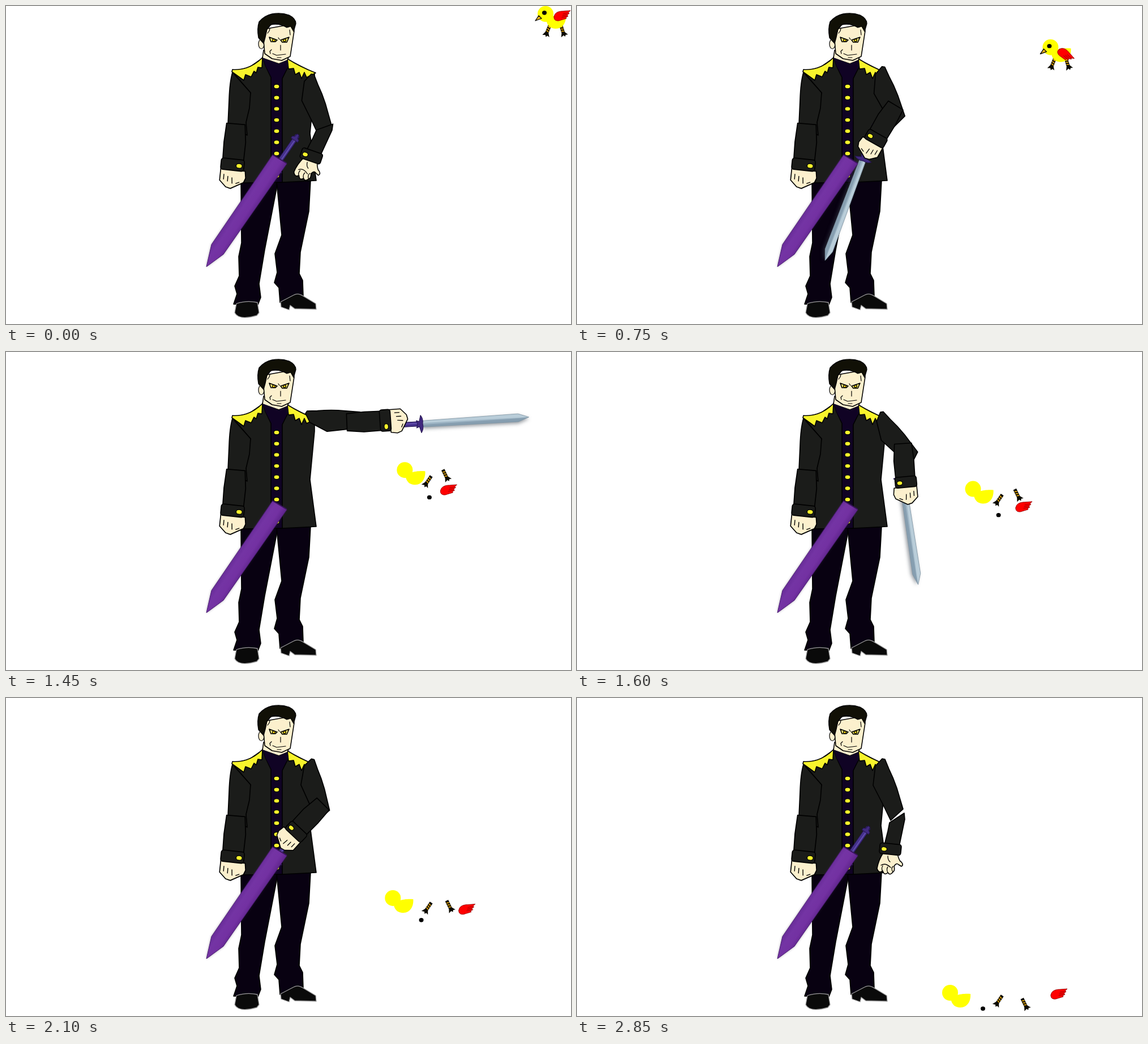
Animation, 998 px wide and 561 px high, one loop 2900 ms. Source, as an HTML page with a canvas:

```html
<!DOCTYPE html>
<html>
<head>
<meta charset="utf-8">
<style>
html, body { margin: 0; width: 100%; height: 100%; overflow: hidden; background: #fff; }
canvas { display: block; }
</style>
</head>
<body>
<canvas id="stage" width="998" height="561"></canvas>
<script>
const ctx = document.getElementById('stage').getContext('2d');
const LOOP = 2900, STEP = 50;
const GRAB = 550, DRAWN = 1100, HIT = 1250, THRUST = 1400, HOLD = 1450;
const LOWERED = 1650, INSERT = 1800, SHEATHED = 1950, LETGO = 2200, END = 2850;
const CLOTH = '#1b1c1a', SKIN = '#fcf0cd', GOLD = '#f8f42c', PANTS = '#080111', SHIRT = '#100324';
const rad = d => d * Math.PI / 180;
const part = (t, from, to) => Math.min(1, Math.max(0, (t - from) / (to - from)));
const mix = (a, b, k) => a.map((v, i) => v + (b[i] - v) * k);

function shape(d, fill, stroke = '#000', width = 1.6) {
  const p = new Path2D(d);
  if (fill) { ctx.fillStyle = fill; ctx.fill(p); }
  if (stroke) { ctx.strokeStyle = stroke; ctx.lineWidth = width; ctx.stroke(p); }
}

const line = (d, width = 1.2) => shape(d, null, '#000', width);

function oval(x, y, rx, ry, fill, stroke) {
  ctx.beginPath();
  ctx.ellipse(x, y, rx, ry, 0, 0, Math.PI * 2);
  ctx.fillStyle = fill;
  ctx.fill();
  if (stroke) { ctx.strokeStyle = stroke; ctx.lineWidth = 1.2; ctx.stroke(); }
}

const button = (x, y) => oval(x, y, 5, 3.8, GOLD, '#000');

function cuff(x, y, deg) {
  placed(x, y, deg, () => {
    ctx.beginPath();
    ctx.roundRect(-19, -9.5, 38, 19, 4);
    ctx.fillStyle = CLOTH;
    ctx.fill();
    ctx.strokeStyle = '#000';
    ctx.lineWidth = 1.6;
    ctx.stroke();
    button(-11, 1);
  });
}

function placed(x, y, deg, draw, sx = 1, sy = 1) {
  ctx.save();
  ctx.translate(x, y);
  ctx.rotate(rad(deg));
  ctx.scale(sx, sy);
  draw();
  ctx.restore();
}

// Open hand: elbow x, y and forearm turn
const OPEN = { start: [563, 213, 13], reach: [554, 197, 15.4], release: [563, 203, 18.7], rest: [565, 211, 0] };
// Fist: elbow x, y, forearm turn; sword guard x, y and angle
const FIST = {
  grip: [560, 187, 37, 475, 286, 124.7],
  drawn: [568, 155, 0, 560, 243, 86.4],
  thrust: [602, 124, -100, 733, 126.5, -3.5],
  lowered: [567, 174, 18, 522, 253, 110],
  insert: [567, 174, 18, 522, 253, 104.5]
};

function fistPose(t) {
  if (t < DRAWN) return mix(FIST.grip, FIST.drawn, part(t, GRAB, DRAWN));
  if (t < HOLD) return mix(FIST.drawn, FIST.thrust, part(t, DRAWN, THRUST));
  if (t < LOWERED) return mix(FIST.thrust, FIST.lowered, part(t, HOLD, LOWERED));
  if (t < INSERT) return mix(FIST.lowered, FIST.insert, part(t, LOWERED, INSERT));
  return mix(FIST.insert, FIST.grip, part(t, INSERT, SHEATHED));
}

function openPose(t) {
  return t < GRAB ? mix(OPEN.start, OPEN.reach, part(t, 0, GRAB))
    : mix(OPEN.release, OPEN.rest, part(t, LETGO, END));
}

function legs() {
  shape('M415 310H479L478 322L457 430L447 490L450 514L445 527L402 526L408 508L404 494L412 476L411 442L416 418Z', PANTS);
  shape('M478 310L538 308L535 362L520 434L518 472L524 484L525 512L484 523L482 497L474 488L479 470L475 437L487 404Z', PANTS);
  shape('M407 525L404 541Q411 555 443 546L447 541L444 523Q425 519 407 525Z', '#0a0a0a', '#999', 1.3);
  shape('M485 522L486 531L500 536L502 528L510 534L548 535L547 525L527 513Q516 505 508 510Z', '#0a0a0a', '#999', 1.3);
}

function torso() {
  shape('M400 116L430 108L453 92L497 94L545 119L545 140L537 225L548 308L488 311L415 312L424 205L432 153Z', CLOTH);
  shape('M453 90L497 94L499 106L488 128V311H468V126L459 107Z', SHIRT);
  for (let y = 142; y < 302; y += 19.7) button(478, y);
  shape('M453 91Q440 104 425 109Q411 113 400 112L399 116L420 131L423 121L433 125L438 115L442 118L445 108L452 109Z', GOLD);
  shape('M497 93Q519 107 547 118L531 126L527 117L522 128L518 117L511 121L508 110L499 111Z', GOLD);
  shape('M400 117L432 153L430 180L424 205L426 228L392 208L394 165Q395 134 400 117Z', CLOTH);
  placed(406, 208, 12, forearm, -1.08, 1.06);
}

function head() {
  shape('M455 78L453 92L482 102L497 96L501 84Z', SKIN);
  shape('M453 91L482 102L497 95L499 106L488 124H468L459 107Z', SHIRT, null);
  oval(451, 67, 5, 8.5, SKIN, '#000');
  shape('M455 60L461 40L506 32L509 44L502 89L487 96L470 93L457 84Z', SKIN);
  shape('M455 66L446 56Q443 40 447 28Q456 17 470 14Q486 11 500 16Q512 22 512 31L508 45L503 36L496 38Q483 30 468 33L461 41L458 55Z', '#111006', '#000', 1.3);
  shape('M465 55L479 60L476 63H468Z', '#e9df70');
  shape('M485 60L500 55L496 64H488Z', '#e9df70');
  for (const x of [473, 492]) oval(x, 60.5, 2.4, 2.4, '#ecc90c', '#000');
  line('M466 40L465 44L462 48M501 42L502 51M481 56L483 59M485 69V78M469 77L466 80L467 84M471 84L478 87L494 85M479 91H486');
}

function sword([x, y, deg]) {
  placed(x, y, deg, () => {
    const a = rad(deg), blade = 'M3 -5L172 -7L191 0L172 7L3 6Z';
    ctx.save();
    ctx.shadowColor = 'rgba(60,70,80,.55)';
    ctx.shadowBlur = 6;
    ctx.shadowOffsetX = -3 * Math.sin(a);
    ctx.shadowOffsetY = 3 * Math.cos(a);
    shape(blade, '#9db4c4', null);
    ctx.restore();
    shape('M3 -5L172 -7L191 0L3 -1Z', '#b9cdd9', null);
    shape('M3 2L174 1L191 0L172 7L3 6Z', '#869eb0', null);
    shape(blade, null, '#7d919f', .7);
    shape('M-70 -4H0V4H-70Z', '#45318c', '#25164f', 1);
    shape('M-64 -1H-4', null, '#6a55b5', 1.4);
    shape('M-72 -2L-66 -3L-64 -7H-60V7H-64L-66 3L-72 2Z', '#402a80', '#25164f', 1);
    shape('M0 -15Q5 -8 3 0Q5 9 0 16L-3 5L-8 7L-6 0L-8 -6L-3 -4Z', '#40287f', '#25164f', 1);
  });
}

function sheath() {
  const body = 'M471 263L496 278L384 438L354 460L363 421Z';
  const g = ctx.createLinearGradient(410, 345, 440, 365);
  ['#642994', '#7434a4', '#7331a2', '#5c2389'].forEach((c, i) => g.addColorStop(i / 3, c));
  ctx.save();
  ctx.shadowColor = 'rgba(60,40,80,.5)';
  ctx.shadowBlur = 4;
  shape(body, g, null);
  ctx.restore();
  shape(body, null, '#4a1c72', 1);
  shape('M472 263L495 277', null, '#3a155e', 2);
}

// Forearm shapes have the elbow at 0, 0.
function forearm() {
  shape('M-15 -2L15 2L13 33L9 62L-25 58L-22 27Z', CLOTH);
  shape('M-31 74L-34 85L-32 93L-13 107L-5 106L7 97L9 77Z', SKIN);
  line('M-12 89L-14 98M-5 88L-6 96M2 86L1 94M-25 94L-20 97', 1.3);
  cuff(-8.5, 67.5, 6);
}

function openForearm() {
  shape('M13 -8L14 3L4 51L-22 48L-16 24L-13 9Z', CLOTH);
  shape('M-24 62Q-33 76 -35 90Q-32 99 -25 94Q-22 103 -16 97Q-12 103 -7 96Q-3 94 -5 86Q-1 79 3 83L8 86C12 84 10 79 6 77Q2 71 1 62Z', SKIN);
  line('M-25 95Q-28 90 -25 85M-16 97Q-19 91 -16 87M-7 96Q-11 90 -7 86M-28 84Q-20 79 -11 88M-16 68Q-16 75 -12 78', 1.3);
  cuff(-11.5, 55.5, 6);
}

// The upper arm aims at a point just below the elbow; the shoulder rises at first.
function arm(t, [ex, ey, turn], fore) {
  const sx = 535, sy = 115 + 13 * (1 - part(t, 0, GRAB));
  const dir = rad(turn + 100);
  const aim = Math.atan2(ey + 12 * Math.sin(dir) - sy, ex + 12 * Math.cos(dir) - sx);
  placed(sx, sy, aim * 180 / Math.PI - 75.5, () =>
    shape('M4 -8L9 -7L16 10Q24 26 30 44L41 81L19 101L5 72L-12 39L-8 5Z', CLOTH));
  placed(ex, ey, turn, fore);
}

function birdBody() {
  oval(0, 0, 14, 14, '#ff0');
  shape('M2 14C4 4 20 1 36 2C37 14 31 26 18 26C9 26 4 21 2 14Z', '#ff0', null);
}

function leg() {
  shape('M-3 -11H3V4L7 10L3 9L1 12L-1 9L-6 11L-3 4Z', '#0c0a00', null);
  for (let y = -7; y < 4; y += 4) shape(`M-1.5 ${y}L1.5 ${y + 1}`, null, '#e8a800', 1.8);
}

function wing() {
  shape('M-2 0C-1 -8 7 -10 14 -10L27 -11L23 -7L25 -6L21 -3L23 -1L19 1L20 3L10 6C3 9 -3 6 -2 0Z', '#f00', '#8a0000', .8);
  for (let i = 0; i < 3; i++) shape(`M${14 - i} ${i * 3 - 5}l9 -2`, null, '#8a0000', .8);
}

// Offsets from the head while whole, then places just after the cut and at the end
const PIECES = [
  { draw: leg, home: [4, 29, 22], cut: [745, 217, 34], land: [745, 534, 34] },
  { draw: leg, home: [30, 29, -18], cut: [776, 206, -26], land: [791, 540, -26] },
  { draw: birdBody, home: [0, 0, 0], cut: [706, 197, 0], land: [659, 520, 0] },
  { draw: () => oval(0, 0, 4, 3.7, '#000'), home: [-2, -2, 0], cut: [749, 246, 0], land: [717, 548, 0] },
  { draw: wing, home: [17, 5, 0], cut: [767, 235, 0], land: [839, 524, 0] }
];

function bird(t) {
  const flight = Math.min(t, HIT), x = 953 - .1555 * flight, y = 14 + .0782 * flight;
  const flap = t > HIT ? 0 : 32 * (1 - Math.cos(t / GRAB * Math.PI * 2));
  for (const { draw, home, cut, land } of PIECES) {
    const whole = [x + home[0], y + home[1], home[2] + (draw === wing ? flap : 0)];
    const pose = t < THRUST ? mix(whole, cut, part(t, HIT, THRUST)) : mix(cut, land, part(t, THRUST, END));
    placed(...pose, draw);
  }
  if (t <= HIT) placed(x, y, 0, () => shape('M-12 3L-18 12L-7 8Z', '#e8b21c', '#000', 1.3));
}

function draw(t) {
  ctx.fillStyle = '#fff';
  ctx.fillRect(0, 0, 998, 561);
  ctx.lineJoin = ctx.lineCap = 'round';
  const fist = fistPose(t);
  legs();
  torso();
  head();
  sword(fist.slice(3));
  sheath();
  if (t >= GRAB && t < LETGO) arm(t, fist, forearm);
  else arm(t, openPose(t), openForearm);
  bird(t);
}

const start = performance.now();
function tick() {
  const t = (performance.now() - start) % LOOP;
  draw(Math.floor(t / STEP) * STEP);
  requestAnimationFrame(tick);
}
tick();
</script>
</body>
</html>
```
